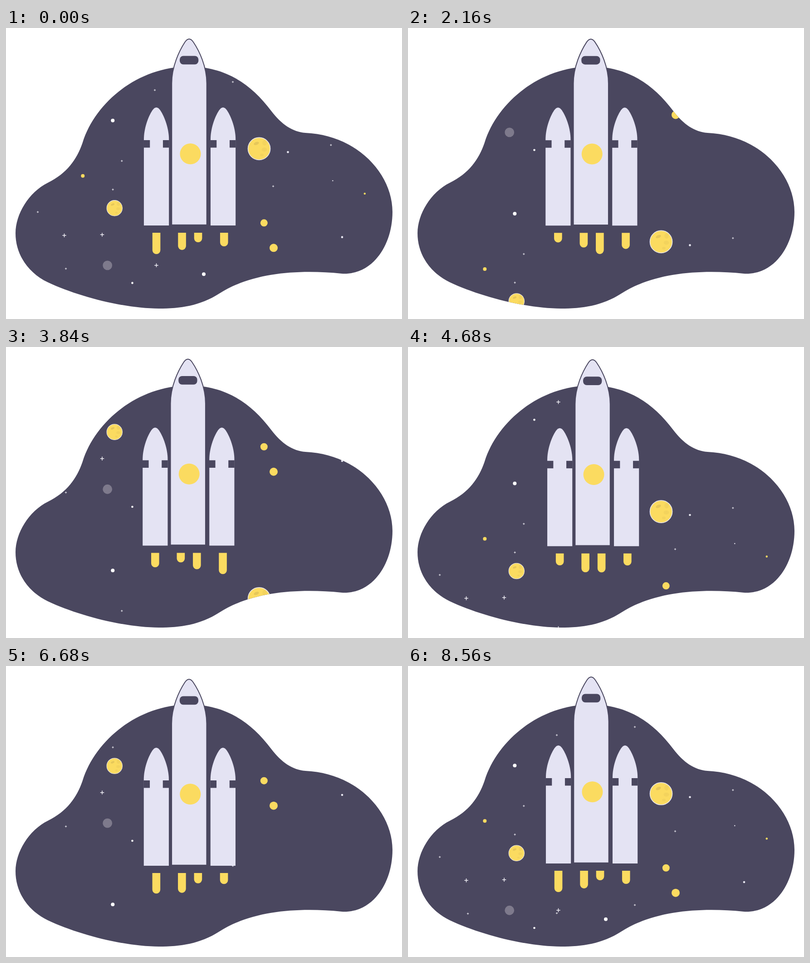
Write an HTML page that moves like this. It is 873 by 641 pixels and loops after 8600 ms.

```html
<!DOCTYPE html>
<html lang="en">
<head>
<meta charset="utf-8">
<title>Rocket in space</title>
<style>
  html, body { margin: 0; width: 100%; height: 100%; overflow: hidden; background: #fff; }
  svg { display: block; width: 100vw; height: 100vh; }
</style>
</head>
<body>
<svg viewBox="0 0 873 641">
  <defs>
    <path id="cloud" d="M92 341C135 320 157 288 169 252C196 165 290 85 403 85C480 85 538 120 585 183
      C607 212 632 229 660 231C775 236 852 322 852 405C852 480 807 545 740 541
      C640 531 540 540 470 585C428 612 384 618 337 618C262 618 160 592 92 560
      C50 540 21 500 21 452C21 410 50 362 92 341Z"/>
    <clipPath id="inside"><use href="#cloud"/></clipPath>
    <g id="field"></g>
    <g id="moon">
      <circle r="24.6" fill="#fbdb60" stroke="#e9e6ee" stroke-width="1.5"/>
      <g fill="#e6c75a">
        <ellipse cx="-6" cy="-11.5" rx="6" ry="3.2" transform="rotate(-22 -6 -11.5)"/>
        <g opacity=".35">
          <ellipse cx="12" cy="-13" rx="5" ry="6"/>
          <ellipse cx="11.5" cy="2" rx="6" ry="4.5"/>
          <ellipse cx="6" cy="14" rx="4" ry="3"/>
        </g>
      </g>
    </g>
    <g id="booster">
      <path fill="#e4e3f3" d="M0 435V245C0 222 9 196 19 181Q27.5 169 36 181C46 196 55.2 222 55.2 245V435Z"/>
      <path fill="#4a475f" d="M-.3 247H13.3V263.5H-.3ZM42 247H55.5V263.5H42Z"/>
    </g>
  </defs>
  <use href="#cloud" fill="#4a475f"/>
  <g clip-path="url(#inside)">
    <use id="lower" href="#field"/>
    <use id="upper" href="#field"/>
  </g>
  <g id="rocket">
    <path fill="#e4e3f3" stroke="#4a475f" stroke-width="2" d="M365.3 433.8V122C365.3 85 382 50 394.5 31
      Q403.8 17.5 413 31C426 50 442.7 85 442.7 122V433.8Z"/>
    <rect x="383" y="61.5" width="41.3" height="18.8" rx="8" fill="#4a475f"/>
    <circle cx="406.5" cy="277.3" r="23" fill="#fbdb60"/>
    <use href="#booster" x="304"/>
    <use href="#booster" x="451"/>
    <g id="flames" fill="#fbdb60"></g>
  </g>
</svg>
<script>
const LOOP = 8600, SPACING = 498;
const BOB = 535;          // ms per rocket bob
const FLICKER = 612;      // ms per flame pulse
const $ = id => document.getElementById(id);

const dot = (x, y, r, fill = '#fff') => `<circle cx="${x}" cy="${y}" r="${r}" fill="${fill}"/>`;
const plus = (x, y, r, w) =>
  `<path d="M${x - r} ${y}H${x + r}M${x} ${y - r}V${y + r}" stroke="#f3f2f8" stroke-width="${w}"/>`;
const moon = (x, y, s) => `<use href="#moon" transform="translate(${x} ${y}) scale(${s})"/>`;

const YELLOW = '#fbdb60', PALE = '#e9e8f2';
const smallStars = [[328, 136.5], [500, 118.5], [255.3, 292.5], [235.6, 355.5], [70, 405],
  [132, 529.8], [716.3, 257.5], [589, 348.3]];
const bigStars = [[128.5, 456.5], [212, 455], [331.5, 522.3]];

$('field').innerHTML =
  smallStars.map(([x, y]) => plus(x, y, 2.2, 1)).join('') +
  bigStars.map(([x, y]) => plus(x, y, 4.2, 1.5)).join('') +
  dot(235.3, 203.5, 4) + dot(436, 542, 4) + dot(278.5, 561.3, 2.3) +
  dot(621.5, 273, 2.3, PALE) + dot(741, 460.3, 2.3, PALE) + dot(720.3, 336, 1.2, PALE) +
  dot(169.3, 325.5, 4, YELLOW) + dot(790.8, 364.5, 2.2, YELLOW) +
  dot(568.8, 429, 8, YELLOW) + dot(590, 484, 9, YELLOW) + dot(223.7, 522.5, 10.4, '#7e7a8c') +
  moon(558, 265.5, 1) + moon(239.3, 396.5, .7);

// x position and phase (in turns) of each flame
const flames = [[322.8, 0], [379.3, .2], [414.8, .5], [472, .7]].map(([x, phase]) => {
  const el = document.createElementNS('http://www.w3.org/2000/svg', 'path');
  $('flames').append(el);
  return { el, x, phase };
});

// moments at which the star field has advanced one more spacing
const passes = [0, 1530, 3060, 4407, 5813, 7157, 8518];
const LAST = 5;

function fieldOffsets(t) {
  let i = 0;
  while (i < LAST && t >= passes[i + 1]) i++;
  const ahead = SPACING * (t - passes[i]) / (passes[i + 1] - passes[i]);
  // the leading field slows down on the final pass
  const lower = i === LAST ? (t - passes[LAST]) * .2906 : ahead;
  return [lower, ahead - SPACING];
}

function draw(t) {
  const [lower, upper] = fieldOffsets(t);
  $('lower').setAttribute('y', lower);
  $('upper').setAttribute('y', upper);

  const turn = 2 * Math.PI * t / BOB;
  const dx = -3.05 * Math.sin(turn);
  const dy = 5 * (1 - Math.cos(turn / 2) ** 4);
  $('rocket').setAttribute('transform', `translate(${dx} ${dy})`);

  for (const { el, x, phase } of flames) {
    const length = 34 + 13 * Math.cos(2 * Math.PI * (t / FLICKER + phase));
    el.setAttribute('d', `M${x} 451h17.6v${length - 8.8}a8.8 8.8 0 0 1 -17.6 0Z`);
  }
}

const start = performance.now();
function tick() {
  draw((performance.now() - start) % LOOP);
  requestAnimationFrame(tick);
}
draw(0);
requestAnimationFrame(tick);
</script>
</body>
</html>
```
